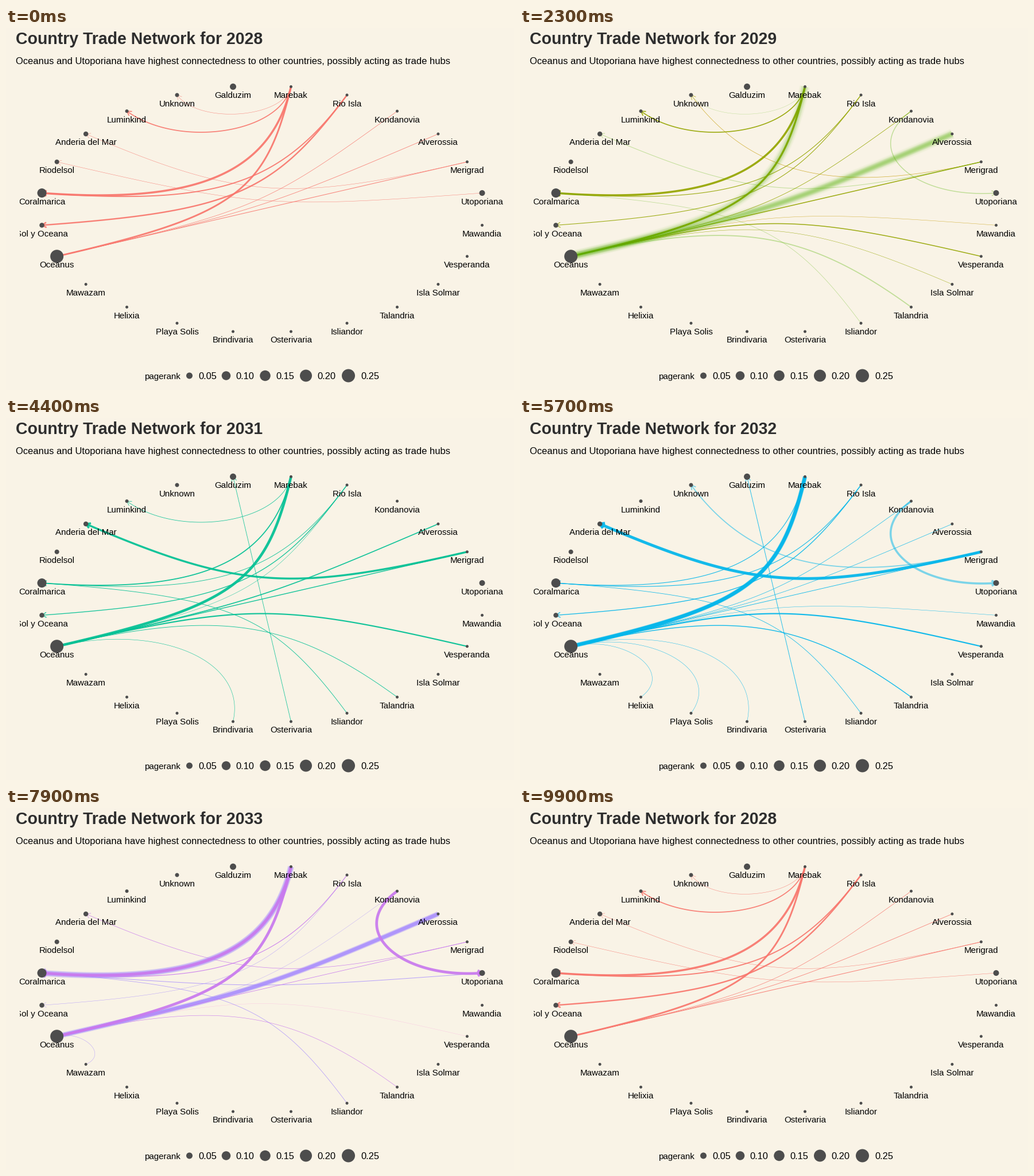
Write a matplotlib script that moves like this. It is 885 by 632 pixels and loops after 10 s.

```python
import numpy as np
import matplotlib.pyplot as plt
from matplotlib.animation import FuncAnimation
from matplotlib.collections import LineCollection
from matplotlib.colors import to_rgb
from matplotlib.patches import Rectangle

W, H, DPI = 885, 632, 100
PT = 72 / DPI
BG, INK, DOT = "#F9F3E6", "#2E2E2E", "#4D4D4D"
plt.rcParams["font.family"] = "Liberation Sans"

# Countries counter-clockwise from the right; letters A to X name them in edges.
NAMES = ["Utoporiana", "Merigrad", "Alverossia", "Kondanovia", "Rio Isla",
         "Marebak", "Galduzim", "Unknown", "Luminkind", "Anderia del Mar",
         "Riodelsol", "Coralmarica", "Sol y Oceana", "Oceanus", "Mawazam",
         "Helixia", "Playa Solis", "Brindivaria", "Osterivaria", "Isliandor",
         "Talandria", "Isla Solmar", "Vesperanda", "Mawandia"]
DIAMETER = dict(A=10, G=11, H=7, I=6, J=8.5, K=8, L=16, M=8.5, N=23)

# Edge widths per year; tuples add translucent bands behind the core.
YEARS = [
    dict(FH=.5, FI=1.7, FL=3.5, FN=2.9, EL=1.9, EM=2.4, DN=.7, CN=.8, BN=1,
         BJ=.5, AK=.5),
    dict(FI=1.7, FL=4.2, FN=2.6, EL=1.2, EM=1.2, DN=.8, BN=1.7, BH=.7,
         WN=1.8, XN=.5, VN=.5),
    dict(FH=.5, FI=1.6, FL=2.6, FN=(4, 9, 14), EL=1, EM=.9, DN=.8,
         CN=(9, 14), BN=1.3, BJ=1, DA=1.5, VN=.5, UN=1.8, TL=.8, WN=1.1),
    dict(FI=.8, FL=1.8, FN=4.6, EL=.9, EM=1.3, EN=.5, CN=1.7, BN=1.4,
         BJ=3.4, SG=.8, WN=2.2, UN=.9, TL=.9, RN=.6),
    dict(FL=1.1, FN=(6, 7.5), EL=1.1, EM=1.3, BJ=5, BH=(0, 1.8), BN=.9,
         CN=.7, DN=.7, DA=(0, 3.6), SG=.9, XN=.5, WN=2.2, UN=1.4, TL=.8,
         RN=.5, QN=.5, PN=.5),
    dict(FL=(5, 7.5, 10.5), FN=4.6, CN=(6, 9), DA=4.6, AL=1, EL=1, EM=.5,
         DN=.4, BN=.8, BJ=.7, ON=.5, TL=.8, UN=.6),
    dict(FL=5, FN=5, DA=5, EL=1.2, BN=.8, BJ=.7, UN=.7, WN=.4),
]
COLORS = [np.array(to_rgb(c)) for c in
          ("#F8766D", "#C49A00", "#53B400", "#00C094", "#00B6EB", "#A58AFF",
           "#FB61D7")]
STARTS = [8, 23, 38, 51, 65, 79, 93]
STEPS = 7

theta = np.radians(7.5 + 15 * np.arange(24))
unit = np.column_stack([np.cos(theta), np.sin(theta)])


def to_px(p):
    return p * [386.8, -215.6] + [446, 316.2]


nodes = to_px(unit)


def arc(edge):
    """Arc pulled towards the centre by its chord length, and its arrowhead."""
    a, b = (unit[ord(c) - 65] for c in edge)
    pull = 1 - np.hypot(*(b - a)) / 2
    p0, p1, p2, p3 = (to_px(p) for p in (a, a * pull, b * pull, b))
    t = np.linspace(0, 1, 80)[:, None]
    u = 1 - t
    path = u**3 * p0 + 3 * u * u * t * p1 + 3 * u * t * t * p2 + t**3 * p3
    d = path[-1] - path[-4]
    ang = np.arctan2(d[1], d[0])
    wings = [p3 - 9 * np.array([np.cos(ang + s), np.sin(ang + s)])
             for s in (-np.pi / 6, np.pi / 6)]
    return path, np.array([wings[0], p3, wings[1]])


ARCS = {e: arc(e) for year in YEARS for e in year}


def strokes(year):
    out = {}
    for edge, widths in year.items():
        for layer, w in enumerate(np.atleast_1d(widths)):
            if w:
                out[edge, layer] = w
    return out


STROKES = [strokes(y) for y in YEARS]

fig = plt.figure(figsize=(W / DPI, H / DPI), dpi=DPI, facecolor=BG)
ax = fig.add_axes([0, 0, 1, 1])
ax.set(xlim=(0, W), ylim=(H, 0))
ax.axis("off")


def label(x, y, s, px, **kw):
    return ax.text(x, y, s, fontsize=px * PT, va="baseline", zorder=4, **kw)


def dots(xy, sizes):
    ax.scatter(*np.transpose(xy), s=(np.array(sizes) * PT) ** 2, c=DOT,
               linewidths=0, zorder=3)


title = label(17, 28, "", 28.55, weight="bold", color=INK)
label(17, 63, "Oceanus and Utoporiana have highest connectedness to other "
      "countries, possibly acting as trade hubs", 16.56)

dots(nodes, [DIAMETER.get(chr(65 + i), 5) for i in range(24)])
panel = Rectangle((24, 70), 843, 500, transform=ax.transData)
for (x, y), name in zip(nodes, NAMES):
    text = label(x, y + 19.5, name, 15.1, ha="center", clip_on=True)
    text.set_clip_path(panel)

label(241, 613, "pagerank", 15.1)
keys = [319, 383, 451, 522, 596]
dots([(x + 0.5, 607) for x in keys], [11, 15.5, 18.5, 21, 23])
for i, x in enumerate([335, 400, 470, 542, 618]):
    label(x, 613, f"{0.05 * (i + 1):.2f}", 16.5)

lines = LineCollection([], zorder=2, capstyle="butt")
ax.add_collection(lines, autolim=False)


def soften(w, alpha, amount, n=7):
    """Nested strokes that look like one blurred stroke."""
    part = 1 - (1 - alpha) ** (1 / n)
    return [(w * (1 + k * amount), part) for k in np.linspace(0.4, -0.8, n)]


def blend(i, t):
    """Strokes as (rank, -layer, edge, width, colour, alpha) during a change."""
    j = (i + 1) % len(YEARS)
    old, new = STROKES[i], STROKES[j]
    p = 1 - (1 - t) ** 3.5
    out = []
    for key in sorted(old.keys() | new.keys()):
        edge, layer = key
        alpha = 0.5 if layer else 0.92
        if key in old and key in new:
            rank, w = 1, old[key] + (new[key] - old[key]) * p
            color = COLORS[i] + (COLORS[j] - COLORS[i]) * p
        elif key in old:
            rank, w, color = 0, old[key], COLORS[i]
            alpha *= 1 - t
        else:
            rank, w, color = 2, new[key], COLORS[j]
            alpha *= 1 - (1 - t) ** 3
        if alpha <= 0:
            continue
        blurred = rank == 2 and w > 8 and t < 1
        parts = soften(w, alpha, 1 - t) if blurred else [(w, alpha)]
        out += [(rank, -layer, edge, pw, color, pa) for pw, pa in parts]
    return sorted(out, key=lambda s: s[:3])


def update(frame):
    i = max(sum(frame >= s for s in STARTS) - 1, 0)
    t = float(np.clip((frame - STARTS[i] + 1) / STEPS, 0, 1))
    segs, widths, colors = [], [], []
    for _, _, edge, w, color, alpha in blend(i, t):
        for seg in ARCS[edge]:
            segs.append(seg)
            widths.append(w * PT)
            colors.append((*color, alpha))
    lines.set_segments(segs)
    lines.set_linewidths(widths)
    lines.set_color(colors)
    title.set_text(f"Country Trade Network for {2028 + (i + (t > 0.5)) % 7}")
    return lines, title


anim = FuncAnimation(fig, update, frames=100, interval=100, repeat=True,
                     repeat_delay=0, blit=False)
plt.show()
```
